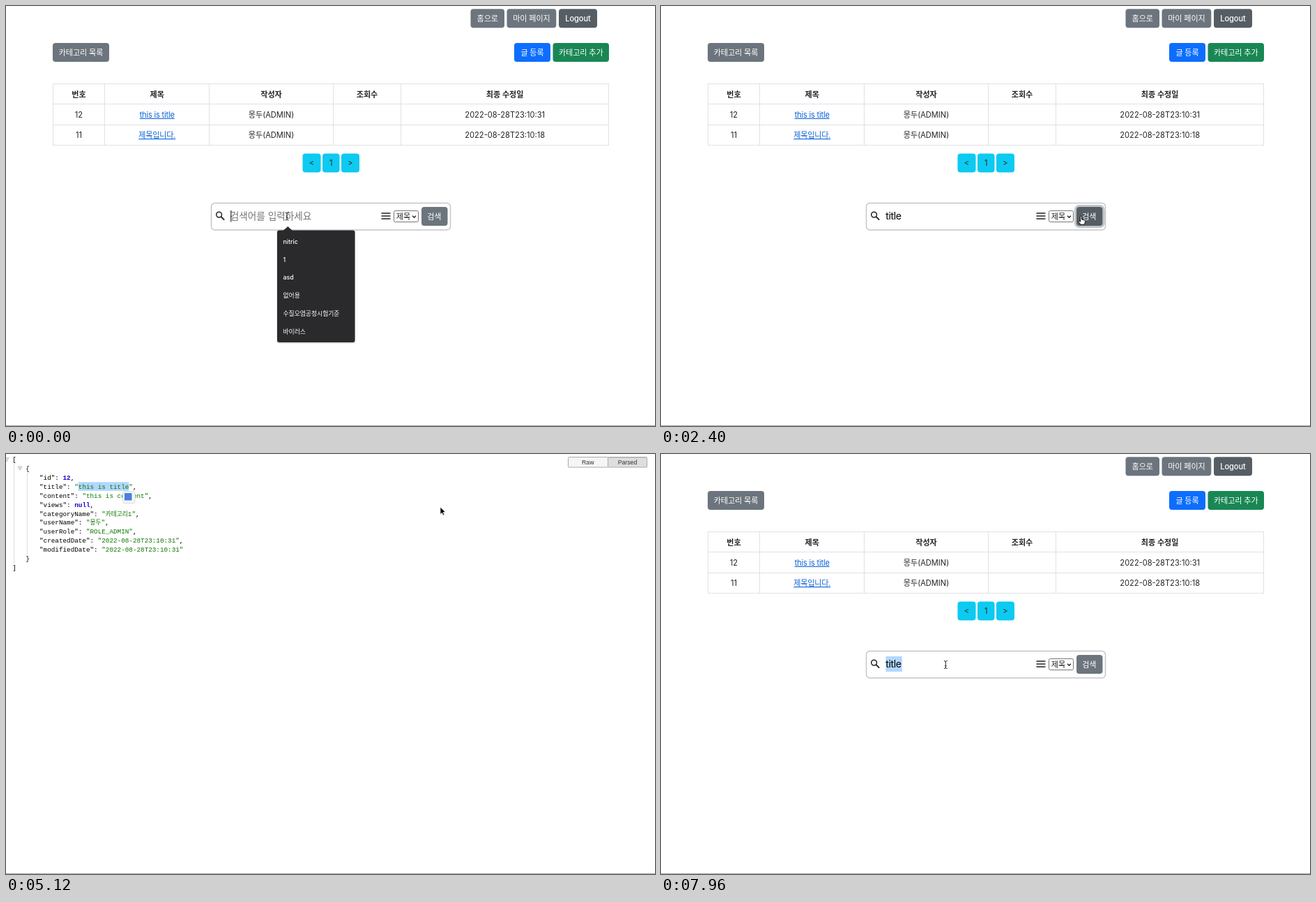
An HTML page that plays this animation: 931x602 px, repeating every 8000 ms.

```html
<!DOCTYPE html>
<html lang="ko">
<head>
<meta charset="utf-8">
<style>
html, body { margin: 0; width: 100%; height: 100%; overflow: hidden; background: #fff; }
svg { display: block; width: 931px; height: 602px; }
text { font: 11.1px Inter, "Noto Sans CJK KR", sans-serif; fill: #212529; white-space: pre; }
.mid { text-anchor: middle; }
.btn { font-weight: 500; fill: #fff; letter-spacing: -.1px; }
.head { font-weight: 700; }
.link { fill: #0a63d8; text-decoration: underline; letter-spacing: -.2px; }
.field { font-size: 14.2px; fill: #000; letter-spacing: -.45px; }
.hint { font-size: 13.6px; fill: #757575; }
.menu { font-size: 8.8px; font-weight: 500; fill: #fff; }
.code { font: 9.3px "Liberation Mono", "Noto Sans CJK KR", monospace; fill: #000; }
.str { fill: #0b7500; }
.lit { fill: #1a01cc; font-weight: 700; }
.tab { font: 8.7px "Liberation Sans", sans-serif; fill: #333; }
</style>
</head>
<body>
<svg id="stage" viewBox="0 0 931 602"></svg>
<script>
const LOOP = 8000, STEP = 40;
const USER = '몽두';

const text = (x, y, s, cls = '') => `<text x="${x}" y="${y}" class="${cls}">${s}</text>`;
const rect = (x, y, w, h, fill, r = 0, extra = '') =>
  `<rect x="${x}" y="${y}" width="${w}" height="${h}" rx="${r}" fill="${fill}" ${extra}/>`;
const path = (d, stroke, w = 1, extra = '') =>
  `<path d="${d}" fill="none" stroke="${stroke}" stroke-width="${w}" ${extra}/>`;
const button = (x, y, w, fill, label, cls = 'btn') =>
  rect(x, y, w, 27, fill, 4) + text(x + w / 2, y + 17.5, label, 'mid ' + cls);

// Board page
const GREY = '#6c757d', DARK = '#565e64', CYAN = '#0dcaf0';

function table() {
  const xs = [67.5, 141.5, 291.5, 469.5, 566.5, 864.5];
  const ys = [111.5, 140.5, 170.5, 199.5];
  const mids = [104.5, 216.7, 380.5, 518, 715.7];
  const rows = [
    ['번호', '제목', '작성자', '조회수', '최종 수정일'],
    ['12', 'this is title', USER + '(ADMIN)', '', '2022-08-28T23:10:31'],
    ['11', '제목입니다.', USER + '(ADMIN)', '', '2022-08-28T23:10:18']
  ];
  const lines = xs.map(x => `M${x} 111V200`).join('') + ys.map(y => `M67 ${y}H865`).join('');
  return path(lines, '#dee2e6') + rows.map((row, r) => row.map((s, c) =>
    text(mids[c], 130.5 + 29.3 * r, s, 'mid ' + (r ? c === 1 ? 'link' : '' : 'head'))
  ).join('')).join('');
}

function searchBar() {
  return rect(294.5, 282.5, 343, 38.5, '#fff', 5, 'stroke="#c6c6ca" stroke-width="1.5"') +
    '<circle cx="305.6" cy="299.1" r="3.9" fill="none" stroke="#222" stroke-width="1.5"/>' +
    path('M308.5 302L313.2 306.7', '#222', 1.8) +
    path('M538.5 297H551.5M538.5 301H551.5M538.5 305H551.5', '#222', 1.5) +
    rect(556.5, 293.5, 35, 16, '#fff', 2, 'stroke="#767676"') +
    text(559.8, 305.5, '제목') +
    path('M583 300.6L585.5 303.2L588 300.6', '#111', 1.3) +
    rect(594.4, 286.4, 40.7, 30.2, 'none', 5.5,
      'id="ring" stroke="#828a91" stroke-opacity=".5" stroke-width="3"') +
    rect(596, 288, 37.5, 27, GREY, 4, 'id="go"') +
    text(614.3, 305.5, '검색', 'mid btn');
}

function suggestions() {
  const items = ['nitric', '1', 'asd', '없어용', '수질오염공정시험기준', '바이러스'];
  return '<g id="menu">' + rect(388.5, 322, 112.5, 161.5, '#000', 3, 'opacity=".2"') +
    '<path d="M397.5 322L404.3 316L411 322Z" fill="#2a2a2c"/>' +
    rect(389, 321.5, 111.5, 160.5, '#2a2a2c', 3) +
    items.map((s, i) => text(397.5, 341 + 25.7 * i, s, 'menu')).join('') + '</g>';
}

const board = '<g id="board">' +
  button(666.5, 4.3, 48.5, GREY, '홈으로') +
  button(718.5, 4.3, 70.8, GREY, '마이 페이지') +
  button(793, 4.3, 55, DARK, 'Logout') +
  button(67, 53, 81, GREY, '카테고리 목록') +
  button(729, 53, 52, '#0d6efd', '글 등록') +
  button(784.5, 53, 80.5, '#198754', '카테고리 추가') +
  table() +
  button(425.5, 211.5, 26, CYAN, '&lt;', '') +
  button(454, 211.5, 24.5, CYAN, '1', '') +
  button(481, 211.5, 26, CYAN, '&gt;', '') +
  searchBar() +
  rect(322.5, 290, 23.3, 22, '#b3d7ff', 0, 'id="mark"') +
  '<text id="hint" class="hint" x="321.8" y="305.5">검색어를 입력하세요</text>' +
  '<text id="field" class="field" x="322.3" y="306"></text>' +
  rect(322.3, 293, 1, 16.5, '#000', 0, 'id="caret"') +
  suggestions() + '</g>';

// JSON page
const CHAR = 5.58;
const lineY = i => 11.4 + 12.85 * i;
const ko = s => `<tspan font-size="8.7">${s}</tspan>`;

function json() {
  const str = s => `<tspan class="str">"${s}"</tspan>`;
  const lit = s => `<tspan class="lit">${s}</tspan>`;
  const pairs = [
    ['id', lit('12')],
    ['title', str('this is title')],
    ['content', str('this is content')],
    ['views', lit('null')],
    ['categoryName', str(ko('카테고리') + '1')],
    ['userName', str(ko(USER))],
    ['userRole', str('ROLE_ADMIN')],
    ['createdDate', str('2022-08-28T23:10:31')],
    ['modifiedDate', str('2022-08-28T23:10:31')]
  ];
  const fold = (x, y) => `<path d="M${x - 3} ${y - 2.5}h6l-3 5.5Z" fill="#ddd" stroke="#bbb" stroke-width=".7"/>`;
  return fold(1, 8) + fold(20, 20.5) +
    path('M11.5 15V157M30.5 28V144', '#bbb', 1, 'stroke-dasharray="1 1"') +
    text(9.2, lineY(0), '[', 'code') + text(28.2, lineY(1), '{', 'code') +
    pairs.map(([k, v], i) =>
      text(48, lineY(i + 2), `"${k}": ${v}${i < pairs.length - 1 ? ',' : ''}`, 'code')).join('') +
    text(28.2, lineY(11), '}', 'code') + text(9.2, lineY(12), ']', 'code');
}

const data = '<g id="data">' +
  rect(103.8, 40.2, 0, 12.6, '#b3d7ff', 0, 'id="range"') + json() +
  rect(806.5, 4.5, 57, 14.5, '#f5f5f5', 1, 'stroke="#aaa"') +
  rect(863.5, 4.5, 56, 14.5, '#dedede', 1, 'stroke="#aaa"') +
  path('M864 5.5H919.5', '#c8c8c8') +
  text(834.8, 14.6, 'Raw', 'mid tab') + text(891.5, 14.6, 'Parsed', 'mid tab') +
  '<g id="chip">' + rect(167.5, 53.5, 17.5, 17, '#f6f6f6', 2, 'stroke="#ddd"') +
  rect(170, 56, 10.5, 10.5, '#4a80e0') + '</g></g>';

const pointers =
  '<g id="arrow"><path d="M0 0V10.4L2.4 8.2L4 11.9L5.7 11.2L4.2 7.5H7.4Z" stroke="#fff" stroke-width=".7"/></g>' +
  '<g id="hand"><path d="M-1 1.2a1 1 0 0 1 2 0V5l4 .9q1.2 .4 1 1.7l-.6 3.2-.8 1.4h-5l-3.6-4.4q.2-1.4 1.6-.7l1.4 1.3Z" fill="#fff" stroke="#000" stroke-width=".9"/></g>' +
  '<g id="beam">' + path('M-2.4-5.5Q0-5.5 0-4V4Q0 5.5 2.4 5.5M2.4-5.5Q0-5.5 0-4M-2.4 5.5Q0 5.5 0 4M-1.3 1.6H1.3', '#222', 1) + '</g>';

const stage = document.getElementById('stage');
stage.innerHTML = board + data + path('M0 601.5H931', '#a8a8a8') + pointers;

const el = {};
stage.querySelectorAll('[id]').forEach(n => el[n.id] = n);
const show = (name, on) => el[name].style.display = on ? '' : 'none';
const within = (t, a, b) => t >= a && t < b;

// Pointer track: time, x, y
const track = [
  [0, 403, 301.5], [1320, 403, 301.5], [1400, 450, 311], [1520, 530, 321],
  [1720, 590, 319], [1920, 606, 310], [2120, 602.5, 301], [2960, 602.5, 301],
  [3040, 480, 230], [3160, 300, 156], [3320, 288, 151], [3400, 265, 141],
  [3480, 150, 70], [3520, 121, 56], [3760, 115, 54], [3920, 106, 48],
  [4120, 104, 47], [4640, 177, 47], [4960, 178, 48], [5120, 623, 76],
  [5320, 795, 110], [5520, 700, 185], [5720, 586, 204], [5880, 586, 203],
  [6080, 520, 200], [6280, 520, 200], [6360, 511, 206.5], [7040, 408.3, 302], [LOOP, 408.3, 302]
];
// Pointer shape from each time on
const shapes = [[0, 'beam'], [440, ''], [1320, 'beam'], [1480, 'arrow'], [1800, 'hand'],
  [2720, 'arrow'], [3480, 'beam'], [5000, 'arrow'], [6880, 'beam']];
const keys = [440, 560, 680, 840, 960];

function pointerAt(t) {
  const i = track.findIndex(p => p[0] > t);
  const [t0, x0, y0] = track[i - 1], [t1, x1, y1] = track[i];
  const k = (t - t0) / (t1 - t0);
  return [x0 + (x1 - x0) * k, y0 + (y1 - y0) * k];
}

function draw(time) {
  const t = Math.floor(time / STEP) * STEP;
  const onData = within(t, 2720, 6440);
  show('board', !onData);
  show('data', onData);

  const typed = keys.filter(k => t >= k).length;
  el.field.textContent = 'title'.slice(0, typed);
  show('hint', !typed);
  show('menu', !typed);
  show('mark', t >= 7240);
  const blink = t < 40 || within(t, 440, 1400) || within(t, 1920, 2160) || within(t, 7120, 7240);
  show('caret', blink);
  const advance = [0, 4.8, 8, 12.8, 16, 23.8][typed];
  el.caret.setAttribute('x', 322.3 + advance);

  const pressed = within(t, 2160, 2720);
  el.go.setAttribute('fill', pressed ? DARK : GREY);
  el.ring.style.opacity = pressed ? Math.min(1, (t - 2120) / 160) : 0;

  const [x, y] = pointerAt(t);
  const cells = within(t, 4120, 5680) ? Math.round(Math.min(13, (t - 4120) / 40)) : 0;
  el.range.setAttribute('width', cells * CHAR);
  show('chip', within(t, 4960, 5880));

  const shape = shapes.filter(s => t >= s[0]).pop()[1];
  for (const name of ['arrow', 'hand', 'beam']) show(name, name === shape);
  if (shape) el[shape].setAttribute('transform', `translate(${x} ${y})`);
}

const start = performance.now();
function tick() {
  draw((performance.now() - start) % LOOP);
  requestAnimationFrame(tick);
}
tick();
</script>
</body>
</html>
```
